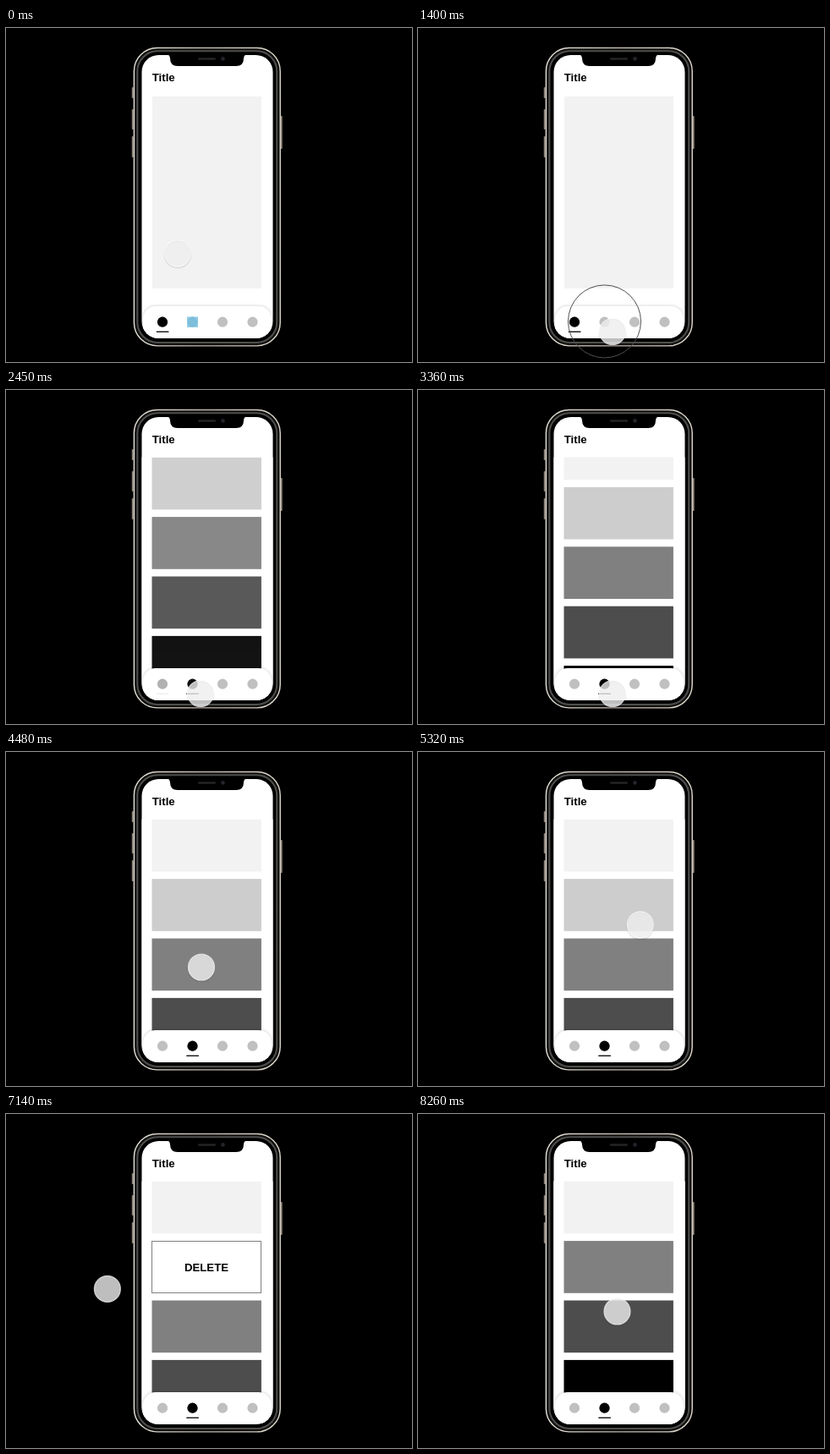
These frames come from a looping animation (480 px wide and 395 px high, 8.82 s). An HTML page:

```html
<!DOCTYPE html>
<html lang="en">
<head>
<meta charset="utf-8">
<title>List prototype</title>
<style>
  html, body { margin: 0; width: 100%; height: 100%; overflow: hidden; background: #000; }
  svg { display: block; width: 100vw; height: 100vh; }
  text { font: bold 13.2px "Liberation Sans", Arial, sans-serif; }
</style>
</head>
<body>
<svg viewBox="0 0 480 395">
  <defs>
    <clipPath id="screen"><rect x="160.5" y="32" width="155" height="335" rx="20"/></clipPath>
    <clipPath id="list"><rect x="160" y="79.5" width="156" height="288"/></clipPath>
    <linearGradient id="edge" x2="1" y2="0">
      <stop offset="0" stop-color="#e8e4db"/>
      <stop offset=".5" stop-color="#bdb6aa"/>
      <stop offset="1" stop-color="#e2dcd0"/>
    </linearGradient>
    <filter id="soft" x="-10%" y="-30%" width="120%" height="160%"><feGaussianBlur stdDeviation="1.5"/></filter>
  </defs>
  <rect width="480" height="395"/>

  <g fill="#998d81">
    <rect x="148.8" y="70" width="1.8" height="13" rx=".8"/>
    <rect x="148.8" y="96" width="1.8" height="24" rx=".8"/>
    <rect x="148.8" y="128" width="1.8" height="25" rx=".8"/>
    <rect x="324.8" y="104" width="1.8" height="39" rx=".8"/>
  </g>
  <rect x="151.4" y="23.5" width="172.8" height="352.4" rx="27.5" fill="#10100f" stroke="url(#edge)" stroke-width="1.4"/>
  <rect x="155.4" y="27.3" width="164.8" height="344.8" rx="24" fill="#000" stroke="#4e4e4c" stroke-width="2"/>

  <g clip-path="url(#screen)">
    <rect x="160" y="32" width="156" height="335" fill="#fff"/>
    <rect x="173" y="81" width="129" height="227" fill="#f2f2f2"/>
    <g clip-path="url(#list)">
      <g id="added"></g>
      <g id="removed"></g>
    </g>
    <text x="172.8" y="62.5">Title</text>
    <rect x="161.5" y="328" width="153" height="50" rx="15" opacity=".13" filter="url(#soft)"/>
    <rect x="162" y="329" width="152" height="50" rx="15" fill="#fff"/>
    <g id="tabs"></g>
    <path d="M190 31H285Q281 32 281 36Q281 45 272 45H203Q194 45 194 36Q194 32 190 31Z"/>
  </g>
  <rect x="227" y="35.3" width="21" height="2.4" rx="1.2" fill="#242424"/>
  <circle cx="256.5" cy="36.4" r="2.3" fill="#24242b"/>

  <circle id="ring" r="43" fill="none" stroke="#505050"/>
  <g id="cursor" fill="none">
    <circle cy="1.4" r="15.6" stroke="#000" stroke-opacity=".1" stroke-width="1.6"/>
    <circle r="15.4" stroke="#fff" stroke-opacity=".75" stroke-width="1.4"/>
    <circle r="15.2" fill="#eee" fill-opacity=".8"/>
  </g>
</svg>
<script>
const LOOP = 8820, STEP = 70;
const SLOT = 70.4, TOP = 79.7, LEFT = 172.5, CARD_W = 129.4, CARD_H = 61.7;
const $ = id => document.getElementById(id);

function add(parent, tag, attrs) {
  const el = document.createElementNS("http://www.w3.org/2000/svg", tag);
  set(el, attrs);
  return parent.appendChild(el);
}
function set(el, attrs) {
  for (const k in attrs) el.setAttribute(k, attrs[k]);
}
function backdrop(g) {
  add(g, "rect", { x: 160, y: 70, width: 156, height: 300, fill: "#fff" });
}
function card(g, slot, fill) {
  return add(g, "rect", { x: LEFT, y: TOP + slot * SLOT, width: CARD_W, height: CARD_H, fill });
}

// List before and after the deletion
const added = $("added"), removed = $("removed");
backdrop(added);
const cards = ["#f2f2f2", "#cdcdcd", "#808080", "#4d4d4d", "#000"].map((c, i) => card(added, i, c));
const del = add(added, "g", {});
add(del, "rect", { x: LEFT, y: 150.5, width: 129, height: 61, fill: "#fff", stroke: "#808080" });
add(del, "text", { x: 237, y: 185.5, "text-anchor": "middle" }).textContent = "DELETE";
backdrop(removed);
["#f2f2f2", "#808080", "#4d4d4d", "#000"].forEach((c, i) => card(removed, i, c));

// Tab bar
const tabX = [185, 220.5, 256, 291.5];
const dot = (g, cx, fill) => add(g, "circle", { cx, cy: 347.7, r: 6.1, fill });
tabX.forEach(x => dot($("tabs"), x, "#c0c0c0"));
const active = tabX.slice(0, 2).map(x => {
  const g = add($("tabs"), "g", {});
  dot(g, x, "#000");
  add(g, "rect", { x: x - 7.2, y: 358.6, width: 14.6, height: 1.3 });
  return g;
});
const hot = add($("tabs"), "g", {});
add(hot, "rect", { x: 214, y: 341.5, width: 13, height: 12.5, fill: "#94cde6" });
dot(hot, tabX[1], "#7dbedb");

const linear = u => u;
const easeOut = u => 1 - (1 - u) ** 2;
const easeInOut = u => u * u * (3 - 2 * u);

function ramp(t, from, to, ease = easeInOut) {
  return ease(Math.min(1, Math.max(0, (t - from) / (to - from))));
}

// Each move: start, end, target x, target y, sideways bulge, easing
const moves = [
  [0, 910, 230, 359, 10, easeInOut],
  [4130, 4480, 231, 254.5, 0, easeInOut],
  [4550, 5460, 265, 201, 0, easeInOut],
  [5880, 6790, 125.5, 206.5, 0, easeInOut],
  [6930, 7210, 119.5, 207, 0, easeOut],
  [7560, 8260, 235.5, 233.5, 0, easeInOut]
];
function cursorAt(t) {
  let x = 203, y = 266.5;
  for (const [a, b, tx, ty, bulge, ease] of moves) {
    const u = ramp(t, a, b, ease);
    x += (tx - x) * u + bulge * 4 * u * (1 - u);
    y += (ty - y) * u;
  }
  return [x, y];
}

function draw(t) {
  const shown = .925 * ramp(t, 1680, 2450, easeOut) + .075 * ramp(t, 2660, 2800, linear);
  const insert = ramp(t, 3010, 3710);
  const swipe = ramp(t, 6230, 6790);

  set(added, { opacity: shown });
  cards.forEach((c, i) => set(c, { y: TOP + (i - 1 + insert) * SLOT }));
  set(cards[1], { x: LEFT - swipe * 145 });
  set(del, { transform: `translate(${(1 - swipe) * 145} 0)` });
  set(removed, { opacity: ramp(t, 7140, 7640, easeOut) });

  set(active[0], { opacity: 1 - shown });
  set(active[1], { opacity: shown });
  set(hot, { opacity: t < STEP ? 1 : 0 });

  const [x, y] = cursorAt(t);
  set($("cursor"), { transform: `translate(${x} ${y})` });
  const tap = t >= 1400 && t < 1610;
  const hold = t >= 5530 && t < 6860;
  const fade = tap ? 1 - ramp(t, 1400, 1610, linear) : hold ? ramp(t, 5460, 5670, linear) : 0;
  set($("ring"), { cx: x - 9.5, cy: y - (tap ? 12 : 9.5), opacity: fade });
}

function tick() {
  const t = performance.now() % LOOP;
  draw(Math.floor(t / STEP) * STEP);
  requestAnimationFrame(tick);
}
tick();
</script>
</body>
</html>
```
